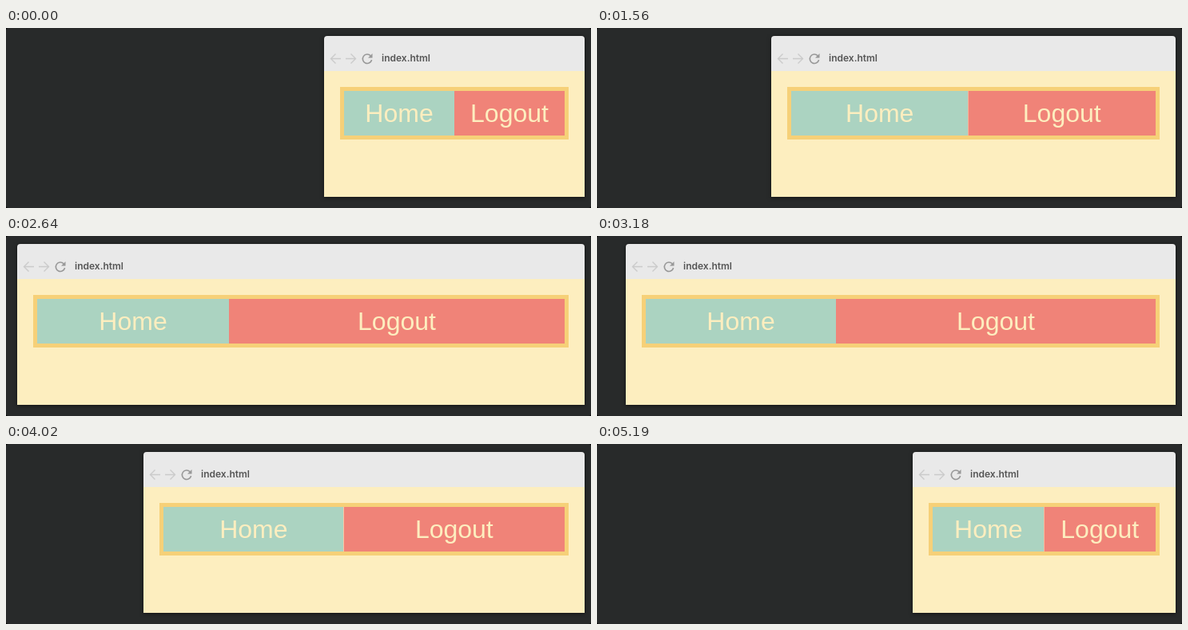
Recreate the animation shown at these times as an HTML page with a canvas. Size 732 by 226 pixels, loop 5.22 s.

```html
<!DOCTYPE html>
<html>
<head>
<meta charset="utf-8">
<style>
  html, body { margin: 0; height: 100%; overflow: hidden; background: #000; }
  canvas { display: block; border-radius: 3px; }
</style>
</head>
<body>
<canvas width="732" height="226"></canvas>
<script>
const ctx = document.querySelector('canvas').getContext('2d');
const LOOP = 5220, TICK = 30, RIGHT = 724, BASIS = 220;
const CREAM = '#fdeebf';

// Left window edge while it is dragged: [ms, px]
const drag = [
  [420, 402], [960, 343], [1020, 337], [1500, 231], [2070, 104], [2580, 19.5],
  [2640, 14], [2730, 11], [2820, 11], [3120, 29], [3570, 93], [3660, 102],
  [4200, 207], [4470, 252], [4740, 295], [5190, 395], [5220, 398], [5340, 402], [5640, 402]
];

const rate = (a, b) => (b[1] - a[1]) / (b[0] - a[0]);

function slope(i) {
  const a = drag[i - 1], p = drag[i], b = drag[i + 1];
  return a && b && rate(a, p) * rate(p, b) > 0 ? rate(a, b) : 0;
}

function leftEdge(time) {
  const t = time < drag[0][0] ? time + LOOP : time;
  const i = drag.findIndex((p, k) => k && t <= p[0]) - 1;
  const [t0, x0] = drag[i], [t1, x1] = drag[i + 1];
  const d = t1 - t0, u = (t - t0) / d, v = 1 - u;
  return v * v * (1 + 2 * u) * x0 + u * u * (3 - 2 * u) * x1
    + d * u * v * (v * slope(i) - u * slope(i + 1));
}

function rect(color, x0, y0, x1, y1) {
  ctx.fillStyle = color;
  ctx.fillRect(x0, y0, x1 - x0, y1 - y0);
}

function text(str, x, y, font, color, align) {
  ctx.font = font;
  ctx.fillStyle = color;
  ctx.textAlign = align;
  ctx.fillText(str, x, y);
}

function stroke(color, width, path) {
  ctx.strokeStyle = color;
  ctx.lineWidth = width;
  ctx.stroke(new Path2D(path));
}

function drawWindow(left) {
  ctx.save();
  ctx.shadowColor = 'rgba(0,0,0,.55)';
  ctx.shadowBlur = 5;
  ctx.shadowOffsetY = 1;
  ctx.fillStyle = '#e9e9e9';
  ctx.beginPath();
  ctx.roundRect(left, 10, RIGHT - left, 202, [4, 4, 0, 0]);
  ctx.fill();
  ctx.restore();
  rect(CREAM, left, 54, RIGHT, 212);

  ctx.save();
  ctx.translate(left, 0);
  stroke('#cbcbcb', 1.4, 'M21 38.5H8.5M14.5 32.5L8.5 38.5L14.5 44.5');
  stroke('#cbcbcb', 1.4, 'M27 38.5H39.5M33.5 32.5L39.5 38.5L33.5 44.5');
  stroke('#989898', 1.6, 'M58.2 34.8A5.7 5.7 0 1 0 59.6 40');
  ctx.fillStyle = '#989898';
  ctx.fill(new Path2D('M60.5 32V37.5H55Z'));
  ctx.restore();
  text('index.html', left + 72, 42, '600 12px Inter, sans-serif', '#555', 'left');
}

function drawNav(left) {
  const x0 = left + 25, x1 = RIGHT - 25, width = x1 - x0;
  // Equal shrink below both bases, 1:10 growth above
  const home = width < 2 * BASIS ? width / 2 : BASIS + (width - 2 * BASIS) / 11;
  const split = x0 + home, seam = Math.floor(split);
  rect('#f6d078', x0 - 5, 74, x1 + 5, 140);
  rect('#abd3c1', x0, 79, seam, 135);
  rect('#f08378', seam, 79, x1, 135);
  ctx.globalAlpha = split - seam;
  rect(CREAM, seam, 79, seam + 1, 135);
  ctx.globalAlpha = 1;
  const font = '32px "Liberation Sans", Arial, sans-serif';
  text('Home', (x0 + split) / 2, 118, font, CREAM, 'center');
  text('Logout', (split + x1) / 2, 118, font, CREAM, 'center');
}

function frame() {
  const time = Math.floor(performance.now() % LOOP / TICK) * TICK;
  const left = Math.round(leftEdge(time));
  rect('#282a2a', 0, 0, 732, 226);
  drawWindow(left);
  drawNav(left);
  requestAnimationFrame(frame);
}
frame();
</script>
</body>
</html>
```
